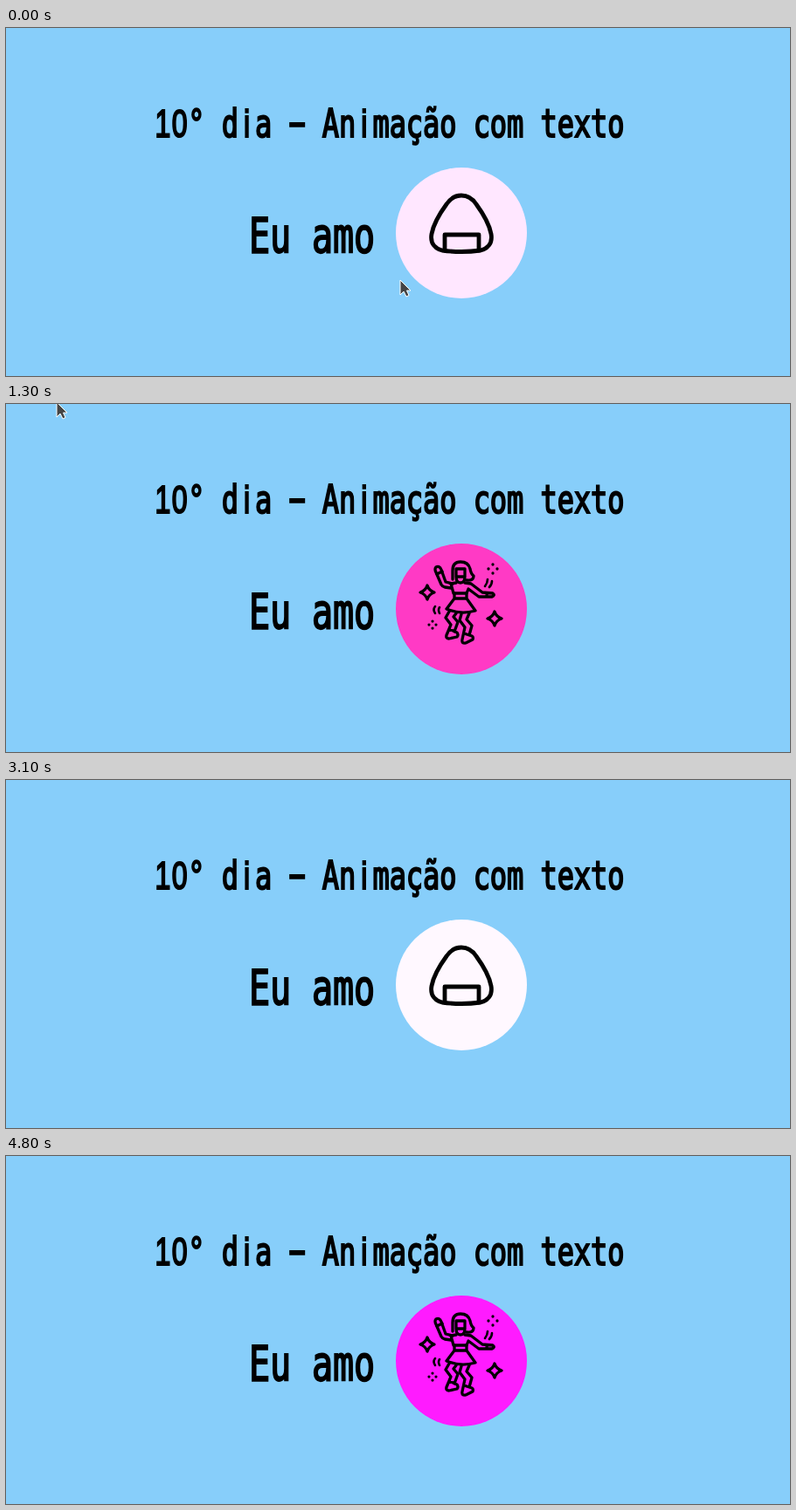
An HTML page for the animation above (4900 ms loop, 897x399 px).

```html
<!DOCTYPE html>
<html lang="pt">
<head>
<meta charset="utf-8">
<style>
  html, body { margin: 0; height: 100%; overflow: hidden; background: #87cefa; }
  svg { display: block; width: 897px; height: 399px; }
  text { text-anchor: middle; font-family: "DejaVu Sans Mono", monospace; stroke: #000; stroke-width: 1.5; }
  .sans { font-family: "Liberation Sans", sans-serif; }
  .icon { fill: none; stroke: #000; stroke-width: 4.8; stroke-linejoin: round; stroke-linecap: round; }
  .thin { stroke-width: 3.3; }
</style>
</head>
<body>
<svg viewBox="0 0 897 399">
  <defs>
    <path id="star" d="M0-8Q2-2 8 0Q2 2 0 8Q-2 2-8 0Q-2-2 0-8Z"/>
    <path id="dots" d="M0-5v.1M5 0v.1M0 5v.1M-5 0v.1"/>
  </defs>
  <circle id="disc" cx="521" cy="235" r="75"/>

  <g class="icon" id="laptop">
    <path d="M484 246V197Q484 195 486 195H553Q555 195 555 197V246M482 246H557L563 261H475Z"/>
    <path d="M509 212L494 219L509 226M522 208L516 231M530 212L545 219L530 226" stroke-linecap="butt"/>
    <path d="M505 250H530V262H505Z" fill="#000" stroke="none"/>
  </g>

  <g class="icon thin" id="dancer">
    <path d="M511 201V191Q511 181 520 181Q529 181 531 189Q532 195 535 197Q535 203 527 202"/>
    <path d="M515 189H525V198Q525 205 520 205Q515 205 515 198ZM515 198H525"/>
    <path d="M511 206L503 204L498 190Q496 185 492 187Q490 189 492 193L498 207Q499 209 502 210L509 211"/>
    <path d="M493 195L499 192M515 205L509 206L512 217H527L529 212L541 221H556Q560 219 557 217L545 216L532 206L525 205M550 217V221"/>
    <path d="M513 217V223H527V217M513 223L504 235Q520 242 537 237L527 223"/>
    <path d="M507 238L503 245L509 253L504 265Q503 269 507 269L516 267Q518 265 516 262L513 261L517 250L512 244L515 240M507 258L514 261"/>
    <path d="M521 241L519 248L525 256L522 270Q521 275 526 274L534 270Q535 267 533 266L530 265L533 254L527 247L530 240M524 263L530 265"/>
    <path d="M491 232Q488 236 491 240M496 233Q494 236 496 240M551 201Q551 205 548 209M556 203Q556 207 553 210" stroke-width="2.6"/>
    <use href="#star" x="482" y="216"/>
    <use href="#star" x="559" y="246"/>
    <use href="#dots" x="557" y="189"/>
    <use href="#dots" transform="translate(488 253) scale(.8)" stroke-width="4"/>
  </g>

  <g class="icon" id="onigiri">
    <path d="M521 192C529 192 534 196 538 202C546 213 553 225 555 236C557 247 551 253 543 255Q521 258 499 255C491 253 485 247 487 236C489 225 496 213 504 202C508 196 513 192 521 192Z"/>
    <path d="M502 255V237H541V255"/>
  </g>

  <path id="cursor" d="M451 289V306L455 302L458 308L461 306.500L458.500 301H463Z" fill="#444" stroke="#fff"/>
</svg>
<script>
const $ = id => document.getElementById(id);
const svg = document.querySelector('svg');
const icons = ['laptop', 'dancer', 'onigiri'];
const LOOP = 4900, CYCLE = 3000, START = 2860;

// One glyph per fixed-width cell, tall like a terminal face
function writeLine(string, x, baseline, size) {
  const text = document.createElementNS(svg.namespaceURI, 'text');
  text.setAttribute('font-size', size);
  text.setAttribute('transform', `translate(${x} ${baseline}) scale(1 1.4)`);
  [...string].forEach((char, i) => {
    if (char === ' ') return;
    const span = document.createElementNS(svg.namespaceURI, 'tspan');
    span.setAttribute('x', i * size * 0.6);
    if ('10i'.includes(char)) span.setAttribute('class', 'sans');
    span.textContent = char;
    text.append(span);
  });
  svg.insertBefore(text, $('cursor'));
}

// The picture steps every 100 ms, then skips some steps after a pause
function stepTime(ms) {
  const t = Math.floor(ms / 100) * 100;
  if (t < 2400) return t;
  if (t < 2800) return 2400;
  if (t >= 4600) return t < 4800 ? 4600 : 4800;
  return (t - 2800) % 300 === 200 ? t - 100 : t;
}

// Yellow to magenta to white, linear, then a hard cut back to yellow
function discColor(p) {
  const mix = p < 1 ? [255 * (1 - p), 255 * p] : [255 * (p - 1), 255];
  return `rgb(255,${mix.map(Math.round)})`;
}

function moveCursor(t) {
  const sweep = Math.max(0, (t - 900) / 300);
  const [dx, dy] = t < 1300 ? [-271 * sweep, -180 * sweep] : [-393, -291];
  $('cursor').setAttribute('transform', `translate(${dx} ${dy})`);
  $('cursor').style.display = t > 1300 ? 'none' : '';
}

function draw() {
  const t = stepTime(performance.now() % LOOP);
  const p = (t + START) % CYCLE / (CYCLE / 2);
  $('disc').setAttribute('fill', discColor(p));
  icons.forEach((id, i) => $(id).style.display = i === Math.round(p) ? '' : 'none');
  moveCursor(t);
  requestAnimationFrame(draw);
}

writeLine('10° dia − Animação com texto', 179.5, 124.5, 32);
writeLine('Eu amo', 290, 257, 40);
draw();
</script>
</body>
</html>
```
